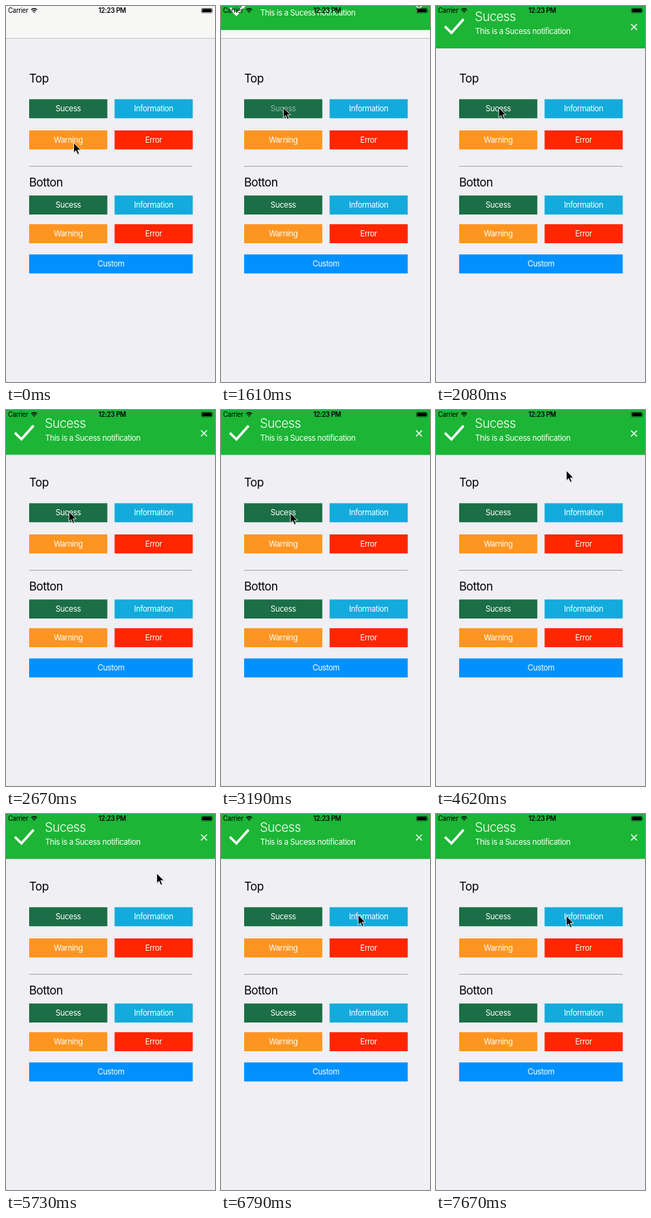
An HTML page for the animation above (8 s loop, 307 by 550 pixels).

```html
<!DOCTYPE html>
<html lang="en">
<head>
<meta charset="utf-8">
<title>Notification banner</title>
<style>
  html, body { margin: 0; width: 100%; height: 100%; overflow: hidden; background: #efeff4; }
  svg { display: block; width: 100%; height: 100%; }
  text { font: 11.46px Inter, "Open Sans", sans-serif; letter-spacing: -.033em; }
  .middle { text-anchor: middle; }
  .heading { font-size: 17px; }
  .title { font-size: 18.8px; font-weight: 300; }
  .status { font-size: 9.7px; }
  .clock { font-weight: 600; }
</style>
</head>
<body>
<svg viewBox="0 0 307 550">
  <rect width="307" height="550" fill="#efeff4"/>
  <rect width="307" height="47" fill="#f7f7f6"/>
  <path d="M0 47.4H307" stroke="#b5b5b8" stroke-width=".8"/>

  <text class="heading" x="34" y="112">Top</text>
  <path d="M34 234.5H274" stroke="#a5a5a9"/>
  <text class="heading" x="34" y="263.5">Botton</text>
  <g id="buttons"></g>

  <g id="banner" fill="#fff">
    <rect y="-20" width="307" height="85.7" fill="#1cb535"/>
    <path d="M13 33.5L22.7 43L40.5 23" fill="none" stroke="#fff" stroke-width="3.6"/>
    <text class="title" x="57" y="26">Sucess</text>
    <text x="57.5" y="45">This is a Sucess notification</text>
    <path d="M286.5 30L295.3 38.6M295.3 30L286.5 38.6" stroke="#fff" stroke-width="1.7" opacity=".85"/>
  </g>

  <text class="status" x="3" y="10">Carrier</text>
  <g fill="none" stroke="#000" stroke-width="1.3">
    <path d="M37 5.6Q41.3 1.8 45.6 5.6M38.7 7.5Q41.3 5.2 43.9 7.5"/>
  </g>
  <path d="M40 8.8Q41.3 7.8 42.6 8.8L41.3 10.2Z"/>
  <text class="status clock middle" x="156" y="10">12:23 PM</text>
  <rect x="287.3" y="3.4" width="15.4" height="6.6" rx="1.3" fill="none" stroke="#000" stroke-width=".6"/>
  <rect x="288.2" y="4.3" width="13.6" height="4.8" rx=".6"/>
  <path d="M303.4 5.6Q304.7 6.7 303.4 7.8Z"/>

  <g id="cursor">
    <path d="M.5 1.5V16.5L4 13.3L6.5 18.6L9 17.6L6.7 12.4H11.4Z" opacity=".18"/>
    <path d="M.4 .6V15.3L3.8 12.1L6.2 17.6L8.7 16.5L6.3 11.2H11Z" stroke="#fff" stroke-width=".9"/>
  </g>
</svg>
<script>
const LOOP = 8000;
const PRESS = 1380, RELEASE = 1440, LIT = 1900;
const byId = id => document.getElementById(id);

const green = "#1b6e45", blue = "#13abdb", orange = "#ff9521", red = "#ff2600";
const left = 34, right = 159.5, half = 114.8;
const buttons = [
  ["Sucess", left, 136.4, half, green],
  ["Information", right, 136.4, half, blue],
  ["Warning", left, 182, half, orange],
  ["Error", right, 182, half, red],
  ["Sucess", left, 277.2, half, green],
  ["Information", right, 277.2, half, blue],
  ["Warning", left, 319.2, half, orange],
  ["Error", right, 319.2, half, red],
  ["Custom", left, 363.4, 240.3, "#0091ff"],
];
byId("buttons").innerHTML = buttons.map(([label, x, y, width, color]) =>
  `<rect x="${x}" y="${y}" width="${width}" height="27.8" fill="${color}"/>
   <text class="middle" x="${x + width / 2}" y="${y + 17.9}" fill="#fff">${label}</text>`).join("");
const pressedLabel = byId("buttons").querySelector("text");

// Pointer tip: time, x, y
const pointer = [
  [540, 99, 199.5], [1020, 91, 148], [2670, 92, 148], [2960, 97, 150],
  [3300, 103, 150], [3670, 105, 147], [3900, 105, 146], [4620, 191, 88],
  [4730, 198, 86], [5010, 222, 83], [5670, 222, 83], [6130, 201, 148],
  [6790, 201, 147], [7140, 201, 122], [7320, 201, 121], [7670, 191, 148.5],
];
const clamp = v => Math.min(1, Math.max(0, v));
const mix = (a, b, p) => a + (b - a) * p;

function pointerAt(t) {
  const next = pointer.findIndex(key => key[0] > t);
  if (next === 0) return pointer[0].slice(1);
  if (next < 0) return pointer.at(-1).slice(1);
  const [t0, x0, y0] = pointer[next - 1], [t1, x1, y1] = pointer[next];
  const p = (t - t0) / (t1 - t0), eased = p * p * (3 - 2 * p);
  return [mix(x0, x1, eased), mix(y0, y1, eased)];
}

function draw(t) {
  const drop = -66 * Math.exp(-4.5 * Math.max(0, t - RELEASE) / 1000);
  byId("banner").setAttribute("transform", `translate(0 ${drop})`);
  byId("cursor").setAttribute("transform", `translate(${pointerAt(t)})`);
  pressedLabel.style.opacity = t < PRESS ? 1 : mix(.2, 1, clamp((t - RELEASE) / (LIT - RELEASE)));
}

const start = performance.now();
function tick() {
  draw((performance.now() - start) % LOOP);
  requestAnimationFrame(tick);
}
tick();
</script>
</body>
</html>
```
